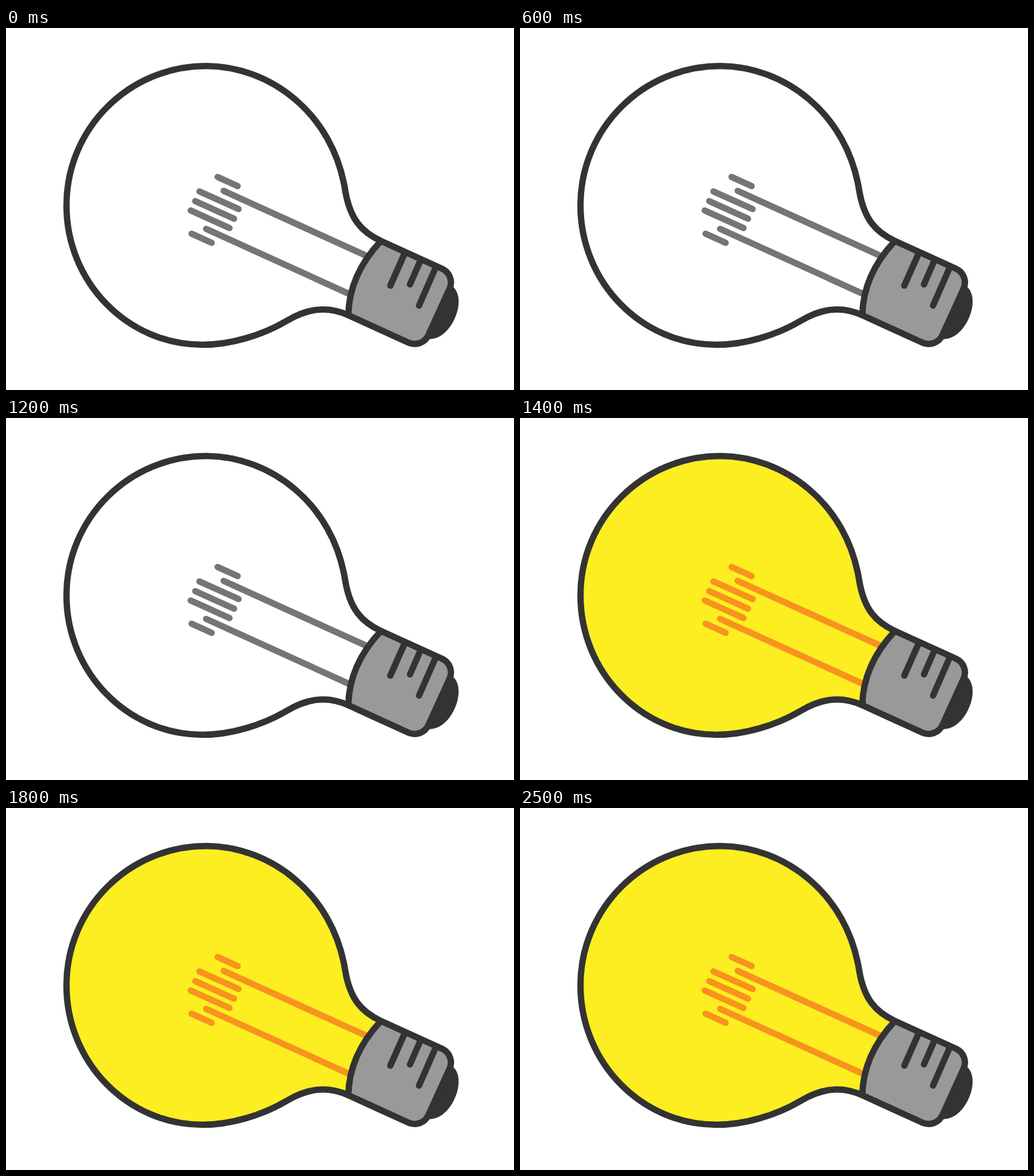
Write an HTML page that moves like this. It is 840 by 600 pixels and loops after 7.5 s.

```html
<!DOCTYPE html>
<html lang="en">
<head>
<meta charset="utf-8">
<title>Flickering light bulb</title>
<style>
  html, body { margin: 0; width: 100%; height: 100%; overflow: hidden; background: #fff; }
  svg { display: block; width: 840px; height: 600px; }
  .line { fill: none; stroke: #333; stroke-width: 10.5; stroke-linecap: round; stroke-linejoin: round; }
  #wires { fill: none; stroke: #757575; stroke-width: 10.5; stroke-linecap: round; }
  #glass { fill: #fff; }
</style>
</head>
<body>
<svg viewBox="0 0 840 600">
  <defs>
    <path id="bulb" d="M620 353 C588 338 569 317 561 270 C541 141 436 63 331 63
      C203.4 63 100 166.4 100 294 C100 421.6 201 525 325 525
      C372 525 424 509 463 486 C498 465 530 460 566 476"/>
    <path id="cap" d="M620 353 L721 399 A25 25 0 0 1 733.4 432.2
      L698.6 508.6 A25 25 0 0 1 665.4 521.5 L566 476 C567 430 585 390 620 353 Z"/>
  </defs>
  <use id="glass" href="#bulb"/>
  <path id="wires" d="M350 247 L383 262 M360 270 L600 379.4 M320 271 L384.500 300
    M313 287 L377 316 M305.500 302.500 L369.500 331.500 M331 333 L571 442.400 M307 341 L340 356"/>
  <path fill="#333" d="M738 428 C751 438 751 460 743 479 C734 501 717 517 698 515.500 Z"/>
  <use href="#cap" class="line" style="fill: #999"/>
  <use href="#bulb" class="line"/>
  <path class="line" d="M659 374 L635.500 427 M685 386 L668 425 M710.500 397 L683 460"/>
</svg>
<script>
  const LOOP = 7500;
  // The lamp starts dark and toggles at each of these times (ms).
  const toggles = [500, 600, 1100, 1200, 1400, 1500, 1600, 1700, 1800, 2000, 2500];

  function flicker(id, prop, off, on) {
    const frames = [0, ...toggles].map((t, i) => ({
      offset: t / LOOP, [prop]: i % 2 ? on : off, easing: 'step-end'
    }));
    frames.push({ offset: 1, [prop]: on });
    document.getElementById(id).animate(frames, { duration: LOOP, iterations: Infinity });
  }

  flicker('glass', 'fill', '#ffffff', '#fcee21');
  flicker('wires', 'stroke', '#757575', '#f7931e');
</script>
</body>
</html>
```
